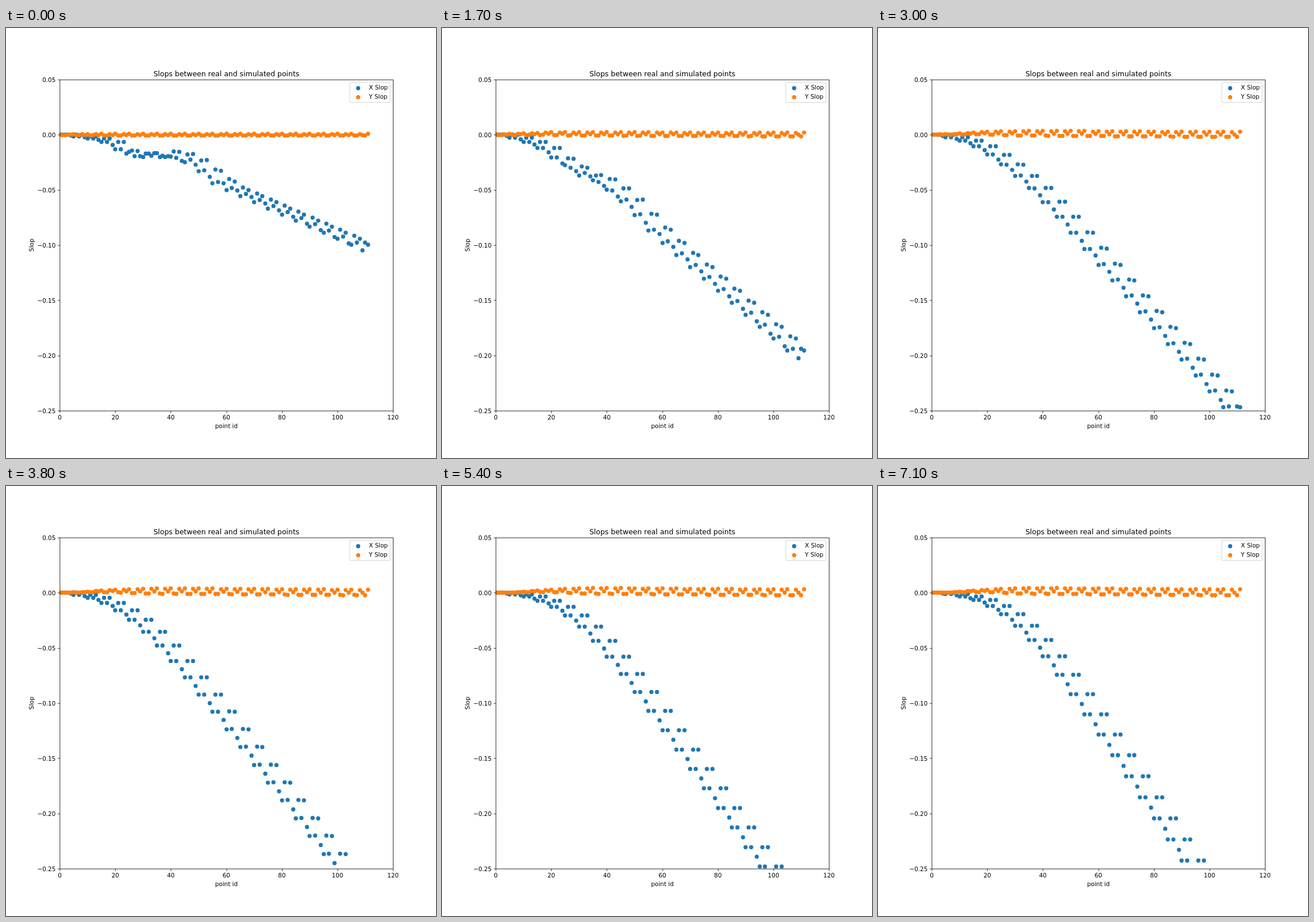
Animation of 748 by 748 pixels, one loop 7200 ms. Source, as an HTML page with a canvas:

```html
<!DOCTYPE html>
<html>
<head>
<meta charset="utf-8">
<style>
  html, body { margin: 0; width: 100%; height: 100%; overflow: hidden; background: #fff; }
  canvas { display: block; }
</style>
</head>
<body>
<canvas id="chart" width="748" height="748"></canvas>
<script>
const ctx = document.getElementById('chart').getContext('2d');
const BLUE = '#1f77b4', ORANGE = '#ff7f0e';
const LOOP = 7200, STEP = 100, COUNT = 112;

// The figure is laid out in 1000 units and scaled to the stage.
const SCALE = 0.748, LEFT = 125, RIGHT = 900, TOP = 120, BOTTOM = 890;
const MIDDLE = (LEFT + RIGHT) / 2;
const xAt = id => LEFT + id / 120 * (RIGHT - LEFT);
const yAt = value => TOP + (0.05 - value) / 0.3 * (BOTTOM - TOP);
const crisp = v => Math.round(v) + 0.5;

const mix = (a, b, f) => a + (b - a) * f;
const clamp = (v, lo, hi) => Math.min(hi, Math.max(lo, v));

// Time, steepness per row of five points, row of the knee, spread of Y.
const keys = [
  [0, 0.0055, 2.5, 0],
  [800, 0.006, 2.1, 0.05],
  [1100, 0.00745, 2, 0.1],
  [1600, 0.0105, 2.5, 0.4],
  [2300, 0.0128, 3.08, 0.7],
  [3800, 0.01615, 4.2, 0.92],
  [4700, 0.0172, 4.8, 1],
  [7100, 0.0191, 5.22, 1]
];

function stateAt(time) {
  const n = Math.max(1, keys.findIndex(key => key[0] >= time));
  const a = keys[n - 1], b = keys[n], f = (time - a[0]) / (b[0] - a[0]);
  const [, slope, knee, spread] = a.map((v, i) => mix(v, b[i], f));
  return { slope, knee, spread, rough: 1 - spread ** 2 };
}

// The last two points repeat earlier places in their row.
const place = id => id === 110 ? 107 : id === 111 ? 105 : id;
const rowShift = [0, -1, 0, -1, 0.5];

const BEND = 1.75;
const softRamp = v => BEND * Math.log(1 + Math.exp(v / BEND));
const noise = id => Math.sin(id * id * 12.9) * 0.002;

function xSlop({ slope, knee, rough }, id) {
  const p = place(id), r = p % 5;
  const row = Math.max(0, Math.floor(p / 5) + rowShift[r]);
  const ramp = slope * (softRamp(row - knee) - softRamp(-knee));
  const hump = 0.0045 * Math.exp(-((row - 4.5) ** 2));
  const sag = 0.0095 * Math.exp(-(((row - 8.7) / 2.1) ** 4));
  const wobble = p >= 24 && p <= 58 ? noise(p) : 0;
  const skew = p > 58 ? [0, 0.0026, 0.0021, 0, -Math.max(-30, p - 89) / 9600][r] : 0;
  return -ramp + rough * skew + rough ** 2 * (sag - hump + wobble);
}

// Height of each place in a row, in thousandths.
const calm = [0.9, -0.8, -0.6, 0.6, -0.1];
const wide = [4.4, -0.8, -0.9, 4, 1.4];

function ySlop({ spread }, id) {
  const p = place(id), r = p % 5;
  const opening = mix(clamp((p + 12) / 32, 0, 1), clamp((p - 8) / 26, 0, 1), spread);
  const bump = spread * Math.exp(-(((p - 18) / 10) ** 2));
  const sink = 1.25 * spread * clamp((p - 40) / 60, 0, 1);
  return (opening * mix(calm[r], wide[r], spread) + bump - sink) / 1000;
}

function dot(x, y, color) {
  ctx.fillStyle = color;
  ctx.beginPath();
  ctx.arc(Math.round(x), Math.round(y), 4.86, 0, Math.PI * 2);
  ctx.fill();
}

function line(x1, y1, x2, y2) {
  ctx.beginPath();
  ctx.moveTo(x1, y1);
  ctx.lineTo(x2, y2);
  ctx.stroke();
}

function label(text, x, y, align = 'center', size = 13.89) {
  ctx.font = `${size}px "DejaVu Sans", sans-serif`;
  ctx.textAlign = align;
  ctx.fillStyle = '#000';
  ctx.fillText(text, x, y);
}

function drawAxes() {
  ctx.strokeStyle = '#000';
  ctx.lineWidth = 1.11;
  ctx.strokeRect(crisp(LEFT), crisp(TOP), RIGHT - LEFT, BOTTOM - TOP);
  for (let id = 0; id <= 120; id += 20) {
    const x = crisp(xAt(id));
    line(x, BOTTOM + 0.5, x, BOTTOM + 5.4);
    label(id, xAt(id), 911);
  }
  for (let n = 1; n >= -5; n--) {
    const value = n * 0.05, y = crisp(yAt(value));
    line(LEFT - 4.4, y, LEFT + 0.5, y);
    label((n < 0 ? '\u2212' : '') + Math.abs(value).toFixed(2), 115.3, y + 5, 'right');
  }
  label('point id', MIDDLE, 930);
  label('Slops between real and simulated points', MIDDLE, 111.7, 'center', 16.67);
  ctx.save();
  ctx.translate(64.3, (TOP + BOTTOM) / 2);
  ctx.rotate(-Math.PI / 2);
  label('Slop', 0, 0);
  ctx.restore();
}

function drawLegend() {
  ctx.beginPath();
  ctx.roundRect(799.5, 127, 93.5, 46, 2.8);
  ctx.fillStyle = 'rgba(255,255,255,.8)';
  ctx.fill();
  ctx.strokeStyle = 'rgba(204,204,204,.8)';
  ctx.lineWidth = 1.39;
  ctx.stroke();
  [['X Slop', BLUE], ['Y Slop', ORANGE]].forEach(([text, color], n) => {
    dot(819, 140 + n * 20.6, color);
    label(text, 844, 143.5 + n * 20.7, 'left');
  });
}

function draw(time) {
  const state = stateAt(time);
  ctx.setTransform(SCALE, 0, 0, SCALE, 0, 0);
  ctx.fillStyle = '#fff';
  ctx.fillRect(0, 0, 1000, 1000);
  ctx.save();
  ctx.beginPath();
  ctx.rect(LEFT, TOP, RIGHT - LEFT, BOTTOM - TOP);
  ctx.clip();
  for (const [curve, color] of [[xSlop, BLUE], [ySlop, ORANGE]]) {
    for (let id = 0; id < COUNT; id++) dot(xAt(id), yAt(curve(state, id)), color);
  }
  ctx.restore();
  drawAxes();
  drawLegend();
}

const start = performance.now();
function tick() {
  const elapsed = (performance.now() - start) % LOOP;
  draw(Math.floor(elapsed / STEP) * STEP);
  requestAnimationFrame(tick);
}
tick();
</script>
</body>
</html>
```
